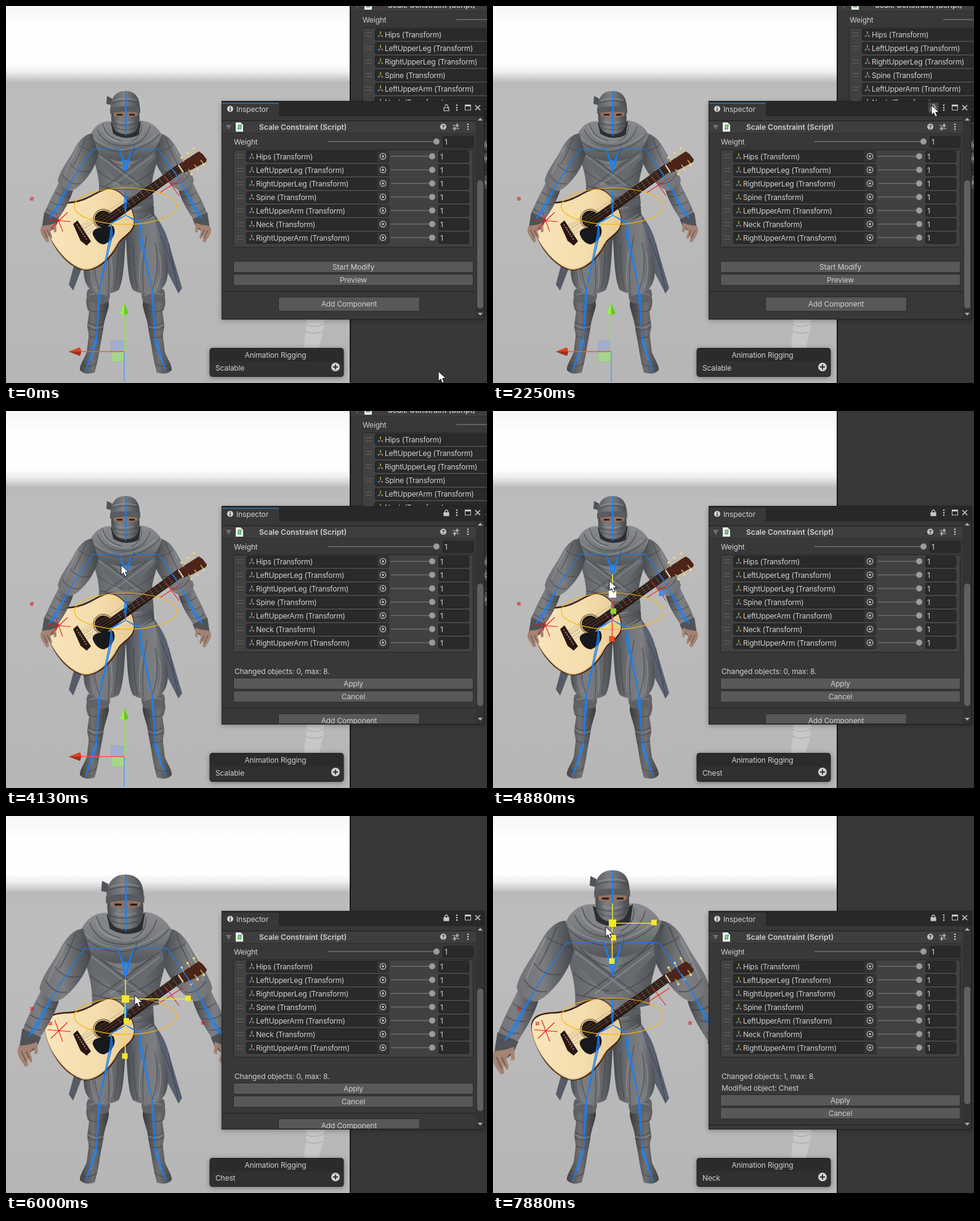
Recreate the animation shown at these times as an HTML page. Size 781 by 612 pixels, loop 8000 ms.

```html
<!DOCTYPE html>
<html lang="en">
<head>
<meta charset="utf-8">
<title>Scale constraint</title>
<style>
html, body { margin: 0; width: 100%; height: 100%; overflow: hidden; background: #383838; }
svg { display: block; width: 781px; height: 612px; }
text { font: 12px Inter, Roboto, sans-serif; letter-spacing: -.15px; fill: #d0d0d0; white-space: pre; }
.bold { font-weight: 600; letter-spacing: 0; }
.mid { text-anchor: middle; }
.row { letter-spacing: -.23px; }
.bone { fill: #1f86f5; fill-opacity: .6; stroke: #1080ff; stroke-width: 1.1; stroke-linejoin: round; vector-effect: non-scaling-stroke; }
.fold { fill: none; stroke: #3c3f43; stroke-width: 1.3; opacity: .6; }
.lite { fill: none; stroke: #a6a8ac; stroke-width: 1.8; opacity: .4; }
</style>
</head>
<body>
<svg id="stage" viewBox="0 0 781 612" xmlns="http://www.w3.org/2000/svg"></svg>
<script>
const stage = document.getElementById('stage');
const rect = (x, y, w, h, fill, more = '') =>
  `<rect x="${x}" y="${y}" width="${w}" height="${h}" fill="${fill}" ${more}/>`;
const path = (d, fill, more = '') => `<path d="${d}" fill="${fill}" ${more}/>`;
const line = (d, color, w = 1, more = '') =>
  `<path d="${d}" fill="none" stroke="${color}" stroke-width="${w}" ${more}/>`;
const dot = (x, y, r, fill, more = '') => `<circle cx="${x}" cy="${y}" r="${r}" fill="${fill}" ${more}/>`;
const text = (x, y, s, cls = '', id = '') =>
  `<text x="${x}" y="${y}" class="${cls}" ${id && `id="${id}"`}>${s}</text>`;
const fold = d => `<path class="fold" d="${d}"/>`;
const lite = d => `<path class="lite" d="${d}"/>`;
const bone = d => `<path class="bone" d="${d}"/>`;
const group = (id, s, more = '') => `<g id="${id}" ${more}>${s}</g>`;
const mirror = 'transform="matrix(-1 0 0 1 389 0)"';
const gradient = (id, stops, vertical) =>
  `<linearGradient id="${id}" x2="${vertical ? 0 : 1}" y2="${vertical ? 1 : 0}">` +
  stops.map(([o, c]) => `<stop offset="${o}" stop-color="${c}"/>`).join('') + '</linearGradient>';

const defs = `<defs>
${gradient('sky', [[0, '#f6f6f6'], [.06, '#fff'], [.155, '#fefefe'], [.175, '#eee'], [.192, '#cfcfcf'], [.203, '#b9b9b9'], [.25, '#bdbdbd'], [1, '#b6b6b6']], true)}
${gradient('cloth', [[0, '#4d5054'], [.3, '#7c7e82'], [.6, '#74767a'], [1, '#43464a']])}
${gradient('chest', [[0, '#5a5d61'], [.45, '#7e8084'], [1, '#484b4f']])}
${gradient('sleeve', [[0, '#707276'], [.45, '#7c7e82'], [1, '#424549']])}
${gradient('cowl', [[0, '#8a8c90'], [.45, '#7a7c80'], [1, '#515458']], true)}
${gradient('boot', [[0, '#444446'], [.45, '#707073'], [1, '#3b3b3e']])}
${gradient('wood', [[0, '#f8e5bb'], [.6, '#f4ddad'], [1, '#e9cb94']])}
<filter id="blur" x="-20%" y="-20%" width="140%" height="140%"><feGaussianBlur stdDeviation="4"/></filter>
<clipPath id="win"><rect x="351" y="155" width="426" height="353"/></clipPath>
<clipPath id="view"><rect x="351" y="179" width="412" height="328"/></clipPath>
<clipPath id="scene"><rect width="558" height="612"/></clipPath>
</defs>`;

// Character, lower half
const leg =
  path('M134 466C128 478 130 488 135 496L132 518C132 526 135 530 134 538L131 562C127 573 119 583 120 591Q128 600 144 595C148 580 151 566 153 551L158 524C159 510 165 498 167 486Q167 472 162 464Z', 'url(#boot)') +
  path('M133 460Q151 454 168 461Q171 475 164 482Q148 486 134 479Q128 470 133 460Z', '#606266') +
  fold('M132 492Q148 501 165 492M133 513Q145 522 158 516M133 521Q145 530 157 524M134 535Q144 541 155 537M124 583Q136 589 148 579') +
  lite('M133 517Q145 526 158 520M135 469Q150 463 165 470M146 543L137 575') +
  path('M149 336C146 362 127 396 126 426C126 446 131 459 145 465Q166 471 183 461C191 446 192 414 194 380L195.500 336Z', 'url(#cloth)') +
  fold('M147 384Q138 424 152 462M160 372Q170 420 166 465M182 384Q183 420 176 460M194 346V380') +
  lite('M140 402Q134 434 144 458M168 396Q175 430 171 456');
const skirt =
  path('M120 386L102 452L109 462L130 408Z', '#565b66') +
  path('M238 334C250 350 260 366 264 384L286 458L280 467C268 442 256 420 242 398Z', '#596070') +
  fold('M264 384L280 463M250 372Q264 400 277 442');
const hips =
  path('M151 296Q194 306 237 296L241 340Q218 354 195 350Q171 354 148 340Z', 'url(#chest)') +
  path('M150 303Q194 316 238 302L240 321Q194 336 148 322Z', '#595c60') +
  fold('M150 310Q194 323 239 310M149 328Q194 344 241 327') +
  lite('M205 352Q220 350 236 338M200 330L220 326');
const lower = `<g>${skirt}${leg}<g ${mirror}>${leg}</g>${hips}</g>`;

// Character, upper half
const arm =
  path('M140 207C126 208 116 222 109 236C101 251 88 266 84 283C88 301 104 303 114 296C130 284 146 262 150 240Z', 'url(#sleeve)') +
  fold('M118 226Q131 235 146 238M104 256Q116 273 136 268M92 274Q104 292 119 288M130 214Q122 236 110 258') +
  lite('M118 226Q106 248 95 274') +
  path('M86 286C78 303 67 322 62 339L82 350C93 335 104 316 109 299Q97 303 86 286Z', 'url(#sleeve)') +
  fold('M80 302Q91 312 104 309M72 317Q83 325 95 322M66 329Q77 339 87 336') +
  path('M62 335L86 346L80 360L71 366L58 361Z', '#505357') +
  path('M58 357C53 366 58 372 66 384L70 382L68 372L73 379L75 375L72 365L77 359L78 368L82 366L81 352L72 355Z', '#a58272') +
  fold('M61 364L67 377M67 364L71 373');
const torso =
  path('M136 212Q194 190 253 212C249 226 247 248 242 264C237 282 236 291 237 304Q194 314 151 304C152 290 150 276 146 262C141 244 140 226 136 212Z', 'url(#chest)') +
  path('M150 236L194 268L240 232L243 246L199 292L187 292L146 250Z', '#66696d') +
  fold('M150 238L226 294M239 236L160 294M149 267Q170 285 190 288M240 266Q218 286 199 288M148 226Q166 255 190 260M241 226Q224 252 201 260M152 292Q194 303 237 292') +
  lite('M151 243L215 291M238 243L174 291');
const scarf =
  path('M167 187C151 187 140 200 136 212C140 232 162 249 184 252L208 251C233 244 247 230 253 209C246 196 234 187 220 186Z', 'url(#cowl)') +
  path('M170 189Q194 203 219 187L215 212Q194 221 175 211Z', '#2b2d31') +
  path('M167 187C153 198 160 219 190 224C223 223 231 203 220 186C227 206 214 214 194 214C175 212 164 202 167 187Z', '#828488') +
  fold('M138 215Q158 236 187 237Q229 233 250 207M148 200Q160 229 197 227Q226 224 234 195M157 191Q162 214 188 219M220 192Q221 213 203 220M208 224Q209 237 196 251') +
  lite('M141 212Q160 231 190 233Q222 228 243 209M156 196Q159 215 183 220');
const head =
  path('M172 150L164 146L163 159L172 161Z', '#505357') +
  path('M171 170Q169 198 181 205Q194 213 208 205Q219 196 216 170Z', '#4a4d51') +
  path('M174 171H214L213 181Q194 185 175 180Z', '#94705f') +
  path('M180 176.500H189M200 176.500H209', 'none', 'stroke="#20191a" stroke-width="2.6"') +
  path('M172 178Q194 185 216 177Q219 194 209 204Q194 211 180 204Q169 194 172 178Z', 'url(#cloth)') +
  path('M170 174C168 150 177 138 194 138C211 138 219 150 217 173Q194 168 170 174Z', 'url(#chest)') +
  path('M169 166Q193 160 218 165V174Q194 168 169 175Z', '#585b5f') +
  fold('M172 158Q192 150 215 157M173 190Q194 198 215 189M176 197Q194 205 211 197') +
  lite('M174 154Q193 147 212 153M179 187Q194 192 207 187');

// Guitar
const pegs = [0, 1, 2].map(i => {
  const x = 289 + 10 * i, y = 253 - 7.5 * i;
  return line(`M${x} ${y}l-4 -6M${x + 7} ${y + 12}l5 7`, '#d6b65b', 1.5) +
    dot(x - 4, y - 7, 2, '#e9d48d') + dot(x + 12, y + 20, 2, '#e9d48d');
}).join('');
const frets = Array.from({ length: 14 }, (_, i) =>
  `M${180 + 7.6 * i} ${327 - 5.15 * i}l7 9`).join('');
const strings = [0, 1, 2, 3].map(i => `M${118 + 2.8 * i} ${362 + 4 * i}L${282 + 1.8 * i} ${259 + 2.6 * i}`).join('');
const guitar =
  path('M62 344C61 323 78 319 101 318C130 316 141 303 160 297C181 290 204 316 208 341C214 369 191 373 182 387C174 407 151 432 126 429C97 424 66 382 62 344Z', '#43200f') +
  path('M63 346C62 325 80 321 103 320.500C132 318 144 304 162 298.500C182 292 203 318 207 342C212 367 189 371 181 386C172 405 149 430 127 428C99 422 67 381 63 346Z', 'url(#wood)') +
  line('M63 347C67 381 99 422 127 427C149 429 171 405 180 386', '#c9a465', 1.2) +
  dot(158, 346, 16, 'none', 'stroke="#8b683d" stroke-width="1.5"') + dot(158, 346, 14, '#21170f') +
  path('M141 371C139 359 158 359 174 357C181 369 172 382 159 387Q147 386 141 371Z', '#17191d') +
  path('M109 354L116 348L138 382L131 389L121 381Z', '#2a1712') +
  line('M115 355L132 381', '#e7dcc2', 1.5, 'stroke-dasharray="1.5 3"') +
  path('M164 340L279 257L287 269L172 352Z', '#291812') +
  line(frets, '#8c7765', .8) + line(strings, '#8b8174', .5) +
  line('M122 356L155 334M126 361L159 339', '#5b4834', 1, 'stroke-dasharray="1 3"') +
  path('M278 259L291 250L313 236L319 240L326 249L325 253L303 265L288 271Z', '#4c2419') +
  line('M280 258L288 270', '#eee5cf', 2) + pegs;
const cross = 'M67 347L105 350M73 361L100 335M79 331L92 366';
const marker = (x, y) => rect(x - 2, y - 2, 4, 4, 'none', 'stroke="#e3141b"') + line(`M${x - 2} ${y + 2}l4 -4`, '#e3141b');

// Rig overlays
const armBone = bone('M142 232L112 275L103 290L109 280Z') + bone('M103 290L77 333L70 345L81 335Z');
const upperBones = armBone + `<g ${mirror}>${armBone}</g>` +
  bone('M142 232.500L184 231.500ZM247 232.500L205 231.500Z') +
  bone('M184 232L189 250L194 270L191 250ZM205 232L200 250L194 270L198 250Z') + bone('M190 250L194 271L198.500 250Z');
const legBone = bone('M194 340L178 348L171 352L177 350Z') + bone('M171 352L169 372L152 459L173 372Z') +
  bone('M152 459L149.500 470L147 536L153 470Z') + bone('M147 536L144 544L129 594L147.500 545Z');
const moveTool =
  rect(171, 544, 21, 17, '#8fa4e8', 'opacity=".5" stroke="#6f89e6"') +
  rect(171, 561, 21, 16, '#9cf06c', 'opacity=".55" stroke="#7fd64d"') +
  line('M192 499V561', '#8fe64c', 1.5) + line('M192 561V610', '#5b9bea', 1.5) + line('M120 561H192', '#ef5a3c', 1.5) +
  path('M192 482L199 499Q192 504 185 499Z', '#98ee50') + path('M192 482L199 499L192 502Z', '#6cc32d') +
  path('M102 561L120 554Q124 561 120 568Z', '#d8432a') + path('M102 561L120 568L122 561Z', '#a42d1a');
const handle = (id, size) => `<rect id="${id}" width="${size}" height="${size}"/>`;
const scaleTool = group('scaleTool', '<path id="axes" fill="none" stroke-width="1.6"/><path id="stem" fill="none" stroke="#f4e52e" stroke-width="1.6"/>' +
  handle('hx', 9) + handle('hy', 9) + handle('hz', 9) + handle('hc', 12));

const ghost = `<g opacity=".45">${path('M488 508H517L515 528Q511 543 508 555H485Q483 545 487 531Z', '#dcdcdc')}${line('M487 517Q501 524 516 516M487 528Q500 535 514 528', '#888')}</g>`;
const scene = `<g clip-path="url(#scene)">${rect(0, 0, 558, 612, 'url(#sky)')}${ghost}${lower}
  <g class="upper"><g ${mirror}>${arm}</g>${torso}${group('scarf', scarf)}${group('head', head)}</g>
  ${guitar}<g class="upper">${arm}</g>
  ${marker(42, 313)}${group('freed', marker(72, 337) + marker(320, 336))}
  ${line(cross, '#f01818', 1.1)}${line('M250 303L287 279M259 278L281 308', '#f01818', 1.1)}
  <g>${legBone}</g><g ${mirror}>${legBone}</g>${bone('M194 299L192 318L194 339L196 318Z')}
  <g class="upper">${upperBones}${group('headBone', bone('M194.500 138L193.500 180L194.500 211L195.500 180Z'))}</g>
  <ellipse cx="194" cy="325" rx="83" ry="29.5" fill="none" stroke="#f5b70a" stroke-width="1.2"/>
  ${group('moveTool', moveTool)}${scaleTool}</g>`;

// Inspector content
const field = (x, y, w) => rect(x + .5, y + .5, w - 1, 18, '#2a2a2a', 'rx="2" stroke="#202020"');
const kebab = (x, y) => [-4, 0, 4].map(d => dot(x, y + d, 1.3, '#c9c9c9')).join('');
const slider = (x1, x2, y) => line(`M${x1} ${y}H${x2}`, '#626262', 2) + dot(x2, y, 5, '#9b9b9b');
const axisIcon = (x, y) => line(`M${x} ${y}V${y - 5}`, '#7fae4a', 1.7) +
  line(`M${x - 1} ${y + 1.5}l-3 2.500`, '#4a8ac4', 2.2) + line(`M${x + 1} ${y + 1.5}l3 2.500`, '#c46a3e', 2.2);
const row = (name, i) => {
  const y = 244 + 22 * i;
  return line(`M375 ${y - 2.5}h10M375 ${y + 2.5}h10`, '#636363') + field(390, y - 9, 232) +
    rect(603, y - 8, 18, 17, '#363636') + axisIcon(399, y) + text(406, y + 4.5, name + ' (Transform)', 'row') +
    dot(612, y, 4.7, 'none', 'stroke="#c4c4c4" stroke-width="1.2"') + dot(612, y, 1.8, '#c4c4c4') +
    slider(625, 692, y) + field(702, y - 9, 50) + text(705, y + 4.5, '1');
};
const button = (x, y, w, h, label, id) =>
  rect(x + .5, y + .5, w - 1, h - 1, '#585858', 'rx="2" stroke="#2c2c2c"') +
  text(x + w / 2, y + h / 2 + 4, label, 'mid', id);
const bones = ['Hips', 'LeftUpperLeg', 'RightUpperLeg', 'Spine', 'LeftUpperArm', 'Neck', 'RightUpperArm'];
const content = group('content',
  rect(351, 186, 413, 21, '#3e3e3e') + line('M351 186.500H764', '#1c1c1c') + line('M351 206.500H764', '#303030') +
  path('M357 193H366L361.500 201Z', '#707070') +
  path('M373 189H381L385 193V204H373Z', '#eeeeee') + text(375.5, 200.5, '#', 'bold', 'hash') +
  text(411, 201, 'Scale Constraint (Script)', 'bold') +
  dot(710, 196, 5, '#c4c4c4') + `<text x="710" y="199.500" style="font-size:9px;font-weight:700;fill:#3e3e3e" class="mid">?</text>` +
  line('M725 194H736M725 199H736', '#c4c4c4', 1.2) + line('M732.500 191V197M728.500 196V202', '#c4c4c4', 2) + kebab(750, 196) +
  text(370, 225, 'Weight') + slider(522, 699, 220) + field(709, 211, 50) + text(712, 225, '1') +
  rect(369.5, 233.5, 389, 158, '#414141', 'rx="3" stroke="#242424"') + bones.map(row).join('') +
  text(371, 427, '', '', 'note1') + text(371, 446, '', '', 'note2') +
  group('foot', button(369, 414, 390, 19, '', 'first') + button(369, 435, 390, 19, '', 'second') +
    line('M351 463.500H764', '#202020') + button(442, 472, 230, 24, 'Add Component')));

const inspector =
  rect(350, 157, 428, 353, '#000', 'opacity=".35" filter="url(#blur)"') +
  `<g clip-path="url(#win)">${rect(351, 155, 426, 353, '#383838')}${rect(351, 155, 426, 24, '#282828')}
  ${rect(351, 157, 92, 22, '#383838')}${rect(351, 157, 92, 1.5, '#3a72b0', 'id="focus"')}
  ${dot(364, 167, 5, '#d4d4d4')}${rect(363.2, 166, 1.6, 4.5, '#383838')}${rect(363.2, 163.5, 1.6, 1.6, '#383838')}
  ${text(374, 172, 'Inspector')}
  ${rect(707, 157, 16, 16, '#4a4a4a', 'id="hover"')}${line('', '#c8c8c8', 1.3, 'id="shackle"')}${rect(711, 165, 8, 5, 'none', 'id="lock" stroke="#c8c8c8" stroke-width="1.2"')}
  ${kebab(732, 165)}${rect(745.5, 161, 9, 8, 'none', 'stroke="#c8c8c8"')}${rect(745, 160, 10, 3, '#c8c8c8')}
  ${line('M762 161L770 169M770 161L762 169', '#c8c8c8', 1.6)}
  <g clip-path="url(#view)">${content}</g>
  ${rect(763, 179, 14, 329, '#333333')}${path('M766 186L770 181.500L774 186Z', '#b0b0b0')}${path('M766 498L770 502.500L774 498Z', '#b0b0b0')}
  ${rect(765, 283, 10, 208, '#606060', 'rx="5" id="thumb"')}</g>` +
  rect(350.5, 154.5, 426, 354, 'none', 'stroke="#222"');
const overlay =
  rect(331, 557, 217, 46, '#000', 'opacity=".4" rx="4" filter="url(#blur)"') +
  rect(331, 555.5, 217, 46, '#2b2b2b', 'rx="4" stroke="#242424"') + rect(332, 577, 215, 24, '#303030', 'rx="3"') +
  text(437.5, 571, 'Animation Rigging', 'mid') + text(340, 592, '', '', 'target') +
  dot(535, 586, 7, '#d0d0d0') + line('M531 586H539M535 582V590', '#303030', 1.8);
const pointer = group('pointer', path('M0 0V16L3.700 12.600L6.400 18.800L9.400 17.500L6.700 11.500L12 11.300Z', '#fff', 'stroke="#111" stroke-width="1"'));

stage.innerHTML = defs + rect(0, 0, 781, 612, '#383838') +
  group('side', '<use href="#content" transform="translate(209 -198)"/>') +
  scene + rect(558, 0, 2, 612, '#191919') + overlay + inspector + pointer;

const $ = id => document.getElementById(id);
const set = (id, attrs) => { for (const a in attrs) $(id).setAttribute(a, attrs[a]); };
const show = (id, on) => $(id).style.display = on ? '' : 'none';
const put = (id, s) => { $(id).textContent = s; };
const uppers = document.querySelectorAll('.upper');
$('hash').style.fill = '#2f9a3f';

// Tracks: [tick, value, ...]; a tick is an eighth of a second
const mouse = [[0, 702, 593], [7, 544, 430], [8, 541, 427], [10, 541, 427], [17, 715, 167], [18, 712, 161],
  [20, 712, 161], [26, 500, 426], [28, 500, 426], [33, 187, 250], [35, 187, 250], [43, 191, 301], [45, 191, 301],
  [48, 209, 291], [51, 224, 284], [54, 195, 163], [56, 195, 163], [60, 187, 176], [63, 183, 180]];
const chestTrack = [[45, 1], [48, 1.27], [49, 1.34], [51, 1.415]];
const headTrack = [[60, 1], [62, .89], [63, .843]];
function at(track, k) {
  const next = track.findIndex(p => p[0] > k);
  if (next < 0) return track[track.length - 1].slice(1);
  if (next === 0) return track[0].slice(1);
  const a = track[next - 1], b = track[next];
  let u = (k - a[0]) / (b[0] - a[0]);
  if (b[0] - a[0] > 4) u = u * u * (3 - 2 * u);
  return a.slice(1).map((v, i) => v + (b[i + 1] - v) * u);
}
const scaleAbout = (x, y, s) => `translate(${x} ${y}) scale(${s}) translate(${-x} ${-y})`;

function drawScaleTool(y, size, dragging) {
  const yellow = '#f4e52e';
  const colors = dragging ? Array(4).fill(yellow) : ['#4a86e8', '#8ed736', '#ea4a22', '#ffffff'];
  const ends = [[194 + 80 * size, y - 1], [195.5, y + 28 * size], [193, y + 73 * size], [194, y]];
  ['hx', 'hy', 'hz', 'hc'].forEach((id, i) => {
    const half = i === 3 ? 6 : 4.5;
    set(id, { x: ends[i][0] - half, y: ends[i][1] - half, fill: colors[i] });
  });
  const down = `M193.500 ${y}V${ends[2][1]}`;
  set('axes', { d: dragging ? `${down}M194 ${y}H${ends[0][0]}` : down, stroke: colors[2] });
  set('stem', { d: `M194 ${y}v-32` });
}

function draw(ms) {
  const k = Math.floor(Math.floor(ms / 10) * 10 / 125);
  const [x, y] = at(mouse, k), [chest] = at(chestTrack, k), [neck] = at(headTrack, k);
  const selected = k >= 36, neckOn = k >= 57, locked = k >= 22;
  const lines = k < 28 ? 0 : neckOn ? 2 : 1;

  set('pointer', { transform: `translate(${x} ${y})` });
  uppers.forEach(g => g.setAttribute('transform', scaleAbout(194, 297, chest)));
  for (const id of ['head', 'headBone']) set(id, { transform: scaleAbout(194, 210, neck) });
  set('scarf', { transform: scaleAbout(194, 210, 1 - (1 - neck) * .35) });
  show('freed', chest > 1.1);

  show('moveTool', !selected);
  show('scaleTool', selected);
  const dragging = (k >= 45 && k < 52) || k >= 60;
  drawScaleTool(neckOn ? 174 : 297, neckOn ? neck : dragging ? chest : 1, dragging);

  show('side', !selected);
  show('focus', !selected);
  show('hover', k >= 17 && k < 23);
  set('shackle', { d: locked ? 'M712.500 165V163Q715 158 717.500 163V165' : 'M712.500 162.500Q715 158 717.500 162V165' });
  set('lock', { fill: locked ? '#c8c8c8' : 'none' });

  put('note1', lines ? `Changed objects: ${lines - 1}, max: 8.` : '');
  put('note2', lines > 1 ? 'Modified object: Chest' : '');
  put('first', lines ? 'Apply' : 'Start Modify');
  put('second', lines ? 'Cancel' : 'Preview');
  set('foot', { transform: `translate(0 ${19 * lines})` });
  set('thumb', { y: 283 - 3 * lines, height: [208, 199, 191][lines] });
  put('target', neckOn ? 'Neck' : selected ? 'Chest' : 'Scalable');
}

const start = performance.now();
function tick() {
  draw((performance.now() - start) % 8000);
  requestAnimationFrame(tick);
}
tick();
</script>
</body>
</html>
```
